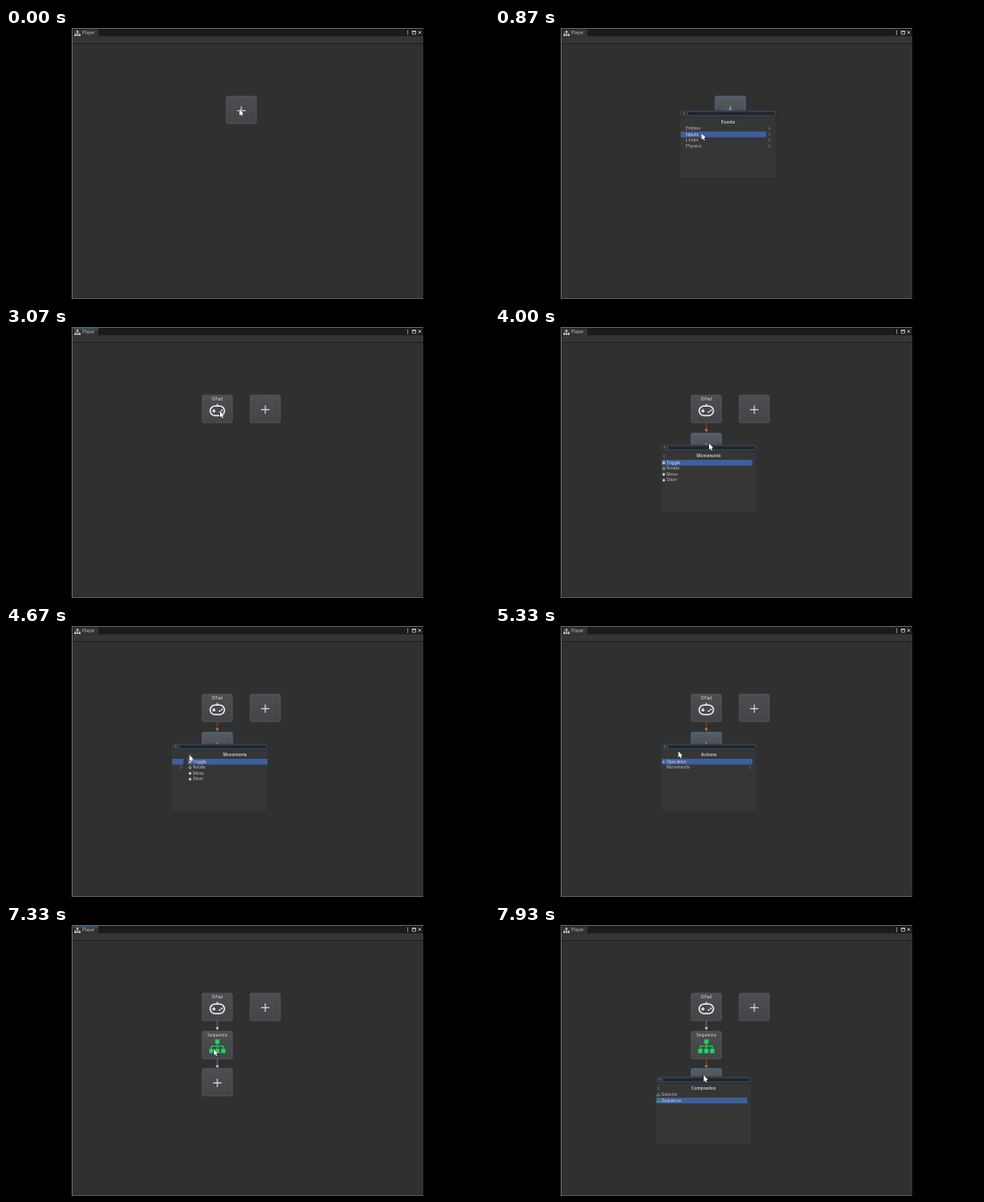
Recreate the animation shown at these times as an HTML page with a canvas. Size 544 px wide and 306 px high, loop 8 s.

```html
<!DOCTYPE html>
<html lang="en">
<head>
<meta charset="utf-8">
<title>Node editor</title>
<style>
html, body { margin: 0; width: 100%; height: 100%; overflow: hidden; background: #000; }
canvas { display: block; width: 544px; height: 306px; }
</style>
</head>
<body>
<canvas id="stage"></canvas>
<script>
const canvas = document.getElementById('stage');
const dpr = window.devicePixelRatio || 1;
canvas.width = 544 * dpr;
canvas.height = 306 * dpr;
const c = canvas.getContext('2d');

const LOOP = 8000, FPS = 15, SLIDE = 267;
const POP_W = 107.4, POP_H = 76, PITCH = 6.6, ROW_TOP = 17.2;
const GREEN = '#16d95e', WHITE = '#d4d4d4';

// Pointer: start position, then moves as start, end, x, y
const home = [262.8, 91.8];
const moves = [
  [533, 867, 232.5, 119], [867, 1067, 230, 125.5], [1333, 1400, 224.5, 117.5],
  [2067, 2200, 222, 112], [2800, 2933, 241, 95], [3533, 3867, 241, 131.5],
  [4133, 4467, 206.5, 147], [4600, 4867, 206.5, 141.5], [5400, 5800, 208, 160],
  [6867, 7333, 234, 140], [7533, 7733, 235, 169.8]
];

// Menu pages; a trailing '>' marks a submenu
const pages = {
  events: { title: 'Events', rows: ['Entities>', 'Inputs>', 'Loops>', 'Physics>'] },
  inputs: { title: 'Inputs', back: true, icon: 'pad', rows: ['DPad', 'Button'] },
  moves: { title: 'Movements', back: true, icon: 'move', rows: ['Toggle', 'Rotate', 'Move', 'Steer'] },
  actions: { title: 'Actions', icon: 'dot', rows: ['Operation', 'Movements>'] },
  nodes: { title: 'Nodes', rows: ['Actions>', 'Composites>'] },
  comps: { title: 'Composites', back: true, icon: 'tree', first: 1, rows: ['Selector', 'Sequence'] }
};

// Menu state: time, page (null when closed), slide direction
const PICK_PAD = 2667, ADD_CHILD = 3600, PICK_SEQ = 6933, ADD_NEXT = 7333;
const views = [
  [0, null], [400, 'events'], [1733, 'inputs', 1], [PICK_PAD, null],
  [3933, 'moves'], [4600, 'actions', -1], [5333, 'nodes', -1], [6533, 'comps'],
  [PICK_SEQ, null], [7933, 'comps']
];

function pointerAt(t) {
  let [x, y] = home;
  for (const [from, to, nx, ny] of moves) {
    const k = Math.min(1, Math.max(0, (t - from) / (to - from)));
    x += (nx - x) * k;
    y += (ny - y) * k;
  }
  return [x, y];
}

function rect(x, y, w, h, fill) {
  c.fillStyle = fill;
  c.fillRect(x, y, w, h);
}

function round(x, y, w, h, r, fill, line, width = 1) {
  c.beginPath();
  c.roundRect(x, y, w, h, r);
  if (fill) { c.fillStyle = fill; c.fill(); }
  if (line) { c.strokeStyle = line; c.lineWidth = width; c.stroke(); }
}

function trace(p) {
  for (let i = 0; i < p.length; i += 2) i ? c.lineTo(p[i], p[i + 1]) : c.moveTo(p[0], p[1]);
}

function lines(color, width, ...paths) {
  c.strokeStyle = color;
  c.lineWidth = width;
  c.beginPath();
  paths.forEach(trace);
  c.stroke();
}

function poly(fill, ...p) {
  c.beginPath();
  trace(p);
  c.closePath();
  c.fillStyle = fill;
  c.fill();
}

function plus(x, y, r, color, width) {
  lines(color, width, [x - r, y, x + r, y], [x, y - r, x, y + r]);
}

function scaled(x, y, s, paint) {
  c.save();
  c.translate(x, y);
  c.scale(s, s);
  paint();
  c.restore();
}

function text(s, x, y, color = '#c4c4c4', align = 'left', weight = 400) {
  c.font = `${weight} 4.75px Inter, sans-serif`;
  c.textAlign = align;
  c.textBaseline = 'middle';
  c.fillStyle = color;
  c.fillText(s, x, y);
}

function tree(x, y, s, color) {
  scaled(x, y, s, () => {
    lines(color, 1.1, [0, -4, 0, 4], [-6.7, 4, -6.7, 0, 6.7, 0, 6.7, 4]);
    rect(-2.4, -7.5, 4.8, 4.8, color);
    for (const i of [-1, 0, 1]) rect(i * 6.7 - 2.4, 3.2, 4.8, 4.8, color);
  });
}

function gamepad(x, y, s) {
  scaled(x, y, s, () => {
    round(-8.2, -5, 16.4, 11, 5.5, null, '#f2f2f2', 1.5);
    lines('#f2f2f2', 1.2, [0, -5, 0, -7.5]);
    plus(-3.9, .6, 2, '#f2f2f2', 1.3);
    rect(1.8, .9, 1.8, 1.8, '#f2f2f2');
    rect(4.2, -.8, 1.8, 1.8, '#f2f2f2');
  });
}

function node(x, y, kind, selected) {
  const g = c.createLinearGradient(0, y, 0, y + 31);
  g.addColorStop(0, selected ? '#585c61' : '#4d4e51');
  g.addColorStop(1, '#434448');
  round(x - 17.5, y - .5, 35, 32, 2, null, '#282828');
  round(x - 17, y, 34, 31, 1.5, g, selected ? '#47749b' : '#5a5b5e', .9);
  if (kind === '+') return plus(x, y + 16.3, 4.7, selected ? '#b4b8bc' : WHITE, 1.2);
  text(kind, x, y + 4.6, '#dcdcdc', 'center');
  if (kind === 'DPad') gamepad(x, y + 17.2, .98);
  else tree(x, y + 16.7, 1, GREEN);
}

function link(x, y, active) {
  const head = active ? '#e0743a' : WHITE;
  lines(active ? '#8f5136' : '#7c7c7c', .9, [x, y, x, y + 8]);
  poly(head, x - 1.9, y + 7.4, x + 1.9, y + 7.4, x, y + 10.8);
}

function frame(focused) {
  rect(74, 0, 396, 306, '#303030');
  rect(75, 1, 395, 8.5, '#1b1b1b');
  rect(76, 1.5, 28, 8, '#343434');
  rect(75, 9.5, 395, 7.5, '#353535');
  rect(75, 17, 395, 1, '#202020');
  rect(74, 0, 396, 1, '#626262');
  rect(74, 0, 1, 306, '#6a6a6a');
  rect(75, 305, 395, 1, '#585858');
  if (focused) rect(76, 1.5, 28, 1, '#3a72b0');
  tree(80.5, 6, .38, '#dedede');
  text('Player', 86.1, 6, '#c0c0c0');
  for (let i = -1; i < 2; i++) rect(452, 4.8 + i * 1.8, 1, 1, WHITE);
  round(457.7, 3.7, 3.8, 3.4, 0, null, WHITE, .7);
  rect(457.4, 3.2, 4.4, 1.2, WHITE);
  lines(WHITE, .9, [464.4, 3.4, 467.4, 6.6], [467.4, 3.4, 464.4, 6.6]);
}

function graph(t, selected) {
  if (t < PICK_PAD) return node(265, 77, '+', selected);
  node(238, 77, 'DPad');
  node(292, 77, '+');
  if (t < ADD_CHILD) return;
  const done = t >= PICK_SEQ, pending = selected && !done;
  link(238, 108, pending);
  node(238, 120, done ? 'Sequence' : '+', pending);
  if (t < ADD_NEXT) return;
  link(238, 151, selected);
  node(238, 162, '+', selected);
}

function rowIcon(kind, i, x, y) {
  if (kind === 'pad') gamepad(x, y, .22);
  if (kind === 'tree') tree(x, y, .23, i ? GREEN : '#6fb6a8');
  if (kind === 'dot') poly(WHITE, x - 1.4, y, x + .4, y - 1.5, x + .4, y + 1.5);
  if (kind !== 'move') return;
  if (i === 1) round(x - 1.3, y - 1.3, 2.6, 2.6, 1.3, null, WHITE, .7);
  else poly(WHITE, x, y - 1.8, x + 1.8, y, x, y + 1.8, x - 1.8, y);
}

function chevron(x, y, dir) {
  lines('#969696', .7, [x - dir * .8, y - 1.6, x + dir * .8, y, x - dir * .8, y + 1.6]);
}

function page(name, x, y, hover) {
  const p = pages[name];
  const pick = p.rows[hover] ? hover : p.first || 0;
  text(p.title, x + POP_W / 2, y + 13.1, '#d2d2d2', 'center', 600);
  if (p.back) chevron(x + 3.4, y + 13.1, -1);
  p.rows.forEach((label, i) => {
    const mid = y + ROW_TOP + (i + .5) * PITCH, sub = label.endsWith('>');
    if (i === pick) rect(x + .4, mid - 3.2, sub ? 96 : 102.5, 6.5, '#3e5f9e');
    text(label.replace('>', ''), x + 6.2, mid, i === pick ? '#e2e2e2' : '#c4c4c4');
    if (sub) chevron(x + 100, mid, 1);
    else rowIcon(p.icon, i, x + 3, mid);
  });
}

function popup(t, at) {
  const [start, name, dir = 0] = views[at];
  // The menu opens right under the pointer and stays there
  let first = at;
  while (views[first - 1][1]) first--;
  const [px, py] = pointerAt(views[first][0]);
  const x = px - POP_W / 2 - .2, y = py + 1.2;
  const hover = Math.floor((pointerAt(t)[1] - y - ROW_TOP) / PITCH);
  c.save();
  c.beginPath();
  c.rect(x, y, POP_W, POP_H);
  c.clip();
  rect(x, y, POP_W, POP_H, '#363636');
  const k = Math.min(1, (t - start) / SLIDE);
  const shift = dir * POP_W * (1 - k * k * (3 - 2 * k));
  if (shift) page(views[at - 1][1], x + shift - dir * POP_W, y, hover);
  page(name, x + shift, y, hover);
  rect(x, y, POP_W, 8, '#2d2d2d');
  round(x + .8, y + 1.2, POP_W - 1.7, 5, 1.2, '#232527', '#3a5f82', .8);
  round(x + 3.2, y + 2.5, 1.9, 1.9, 1, null, '#a0a0a0', .6);
  rect(x + 7.2, y + 2.2, .5, 3.2, '#909090');
  c.restore();
}

function pointer(t) {
  scaled(...pointerAt(t), 1, () => {
    c.lineWidth = 1;
    c.strokeStyle = '#151515';
    c.lineJoin = 'round';
    poly('#fff', 0, 0, 0, 7, 1.6, 5.6, 2.8, 8, 3.9, 7.5, 2.8, 5.1, 4.9, 5);
    c.globalCompositeOperation = 'source-over';
    c.stroke();
    c.fill();
  });
}

function draw(now) {
  const step = Math.floor(now % LOOP * FPS / 1000 + .1);
  const t = step * 1000 / FPS % LOOP + 1;
  const at = views.findLastIndex(v => v[0] <= t);
  const open = views[at][1] !== null;
  c.setTransform(dpr, 0, 0, dpr, 0, 0);
  rect(0, 0, 544, 306, '#000');
  frame(t >= PICK_PAD && !open);
  graph(t, open);
  if (open) popup(t, at);
  pointer(t);
}

const start = performance.now();
function tick() {
  draw(performance.now() - start);
  requestAnimationFrame(tick);
}
tick();
</script>
</body>
</html>
```
